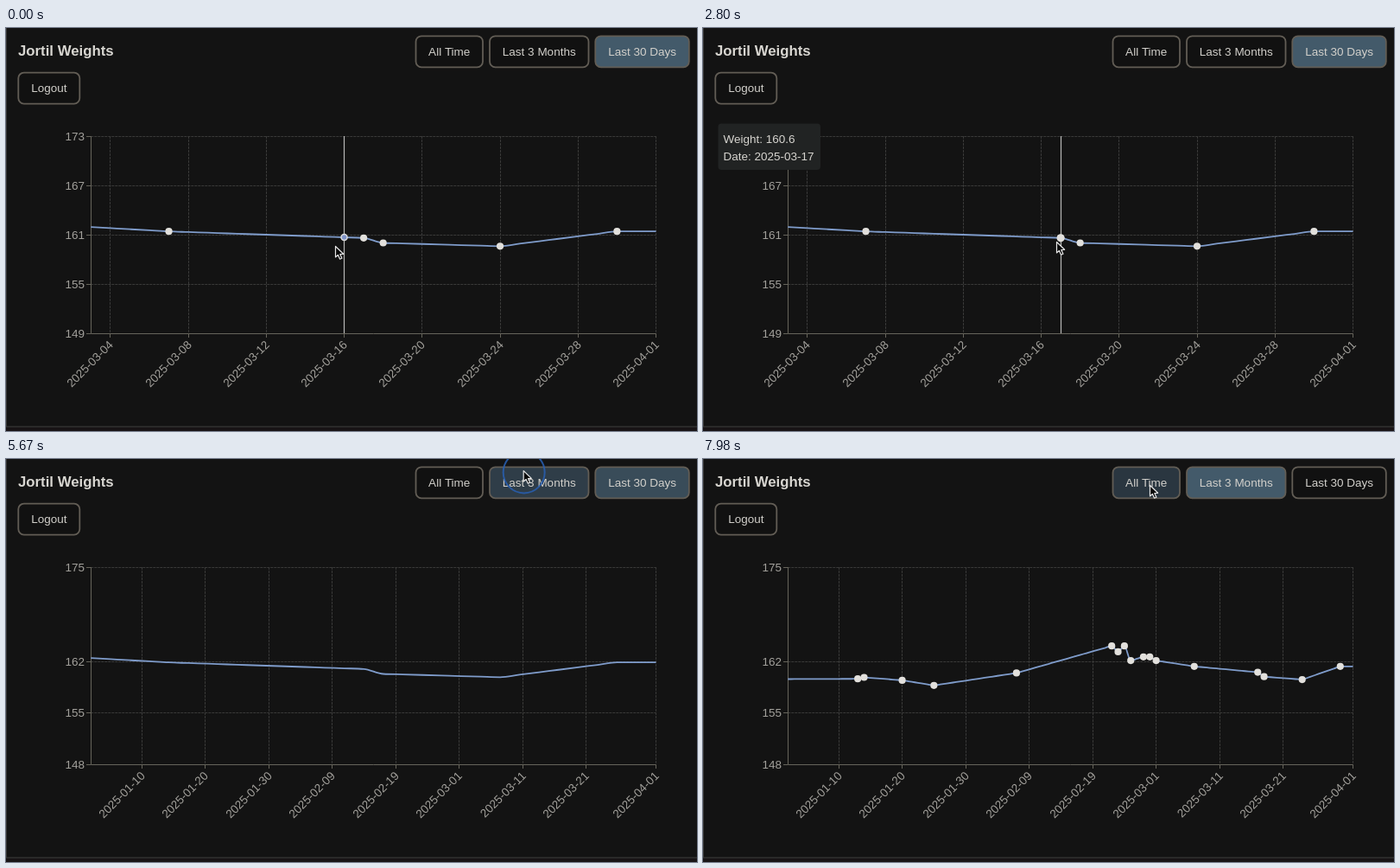
Animation of 800 by 466 pixels, one loop 8 s. Source, as an HTML page with a canvas:

```html
<!DOCTYPE html>
<html lang="en">
<head>
<meta charset="utf-8">
<title>Weight chart</title>
<style>
  html, body { margin: 0; width: 100%; height: 100%; overflow: hidden; background: #131313; }
  canvas { display: block; width: 800px; height: 466px; }
</style>
</head>
<body>
<canvas id="stage" width="800" height="466"></canvas>
<script>
const ctx = document.getElementById('stage').getContext('2d');
const FONT = '"Liberation Sans", Arial, sans-serif';
const LOOP = 8000, DAY_MS = 864e5;
const LEFT = 98.3, RIGHT = 752.5, TOP = 125, BOTTOM = 353;
const CLICK = 5590, MORPH_START = 5670, MORPH_END = 7670;
const POINTER_LAG = 100;
const BASE = [17, 17, 17], HOVER = [42, 54, 64], ACTIVE = [67, 90, 106];

const clamp = v => Math.max(0, Math.min(1, v));
const lerp = (a, b, k) => a + (b - a) * k;
const ramp = (t, start, length) => clamp((t - start) / length);
const smooth = k => k * k * (3 - 2 * k);
const crisp = v => Math.floor(v) + 0.5;
const mix = (a, b, k) => a.map((v, i) => lerp(v, b[i], k));
const rgb = c => `rgb(${c.map(Math.round)})`;

// CSS "ease", solved by bisection
function ease(x) {
  let lo = 0, hi = 1, s = 0.5;
  for (let i = 0; i < 24; i++) {
    s = (lo + hi) / 2;
    if (0.75 * s * (1 - s) + s ** 3 < x) lo = s; else hi = s;
  }
  return 0.3 * s * (1 - s) ** 2 + 3 * s * s * (1 - s) + s ** 3;
}

// Measurements: day of 2025 (Jan 1 = 0) and weight; both charts show parts of them.
const WEIGHTS = new Map([
  [-20, 159.6], [12, 159.7], [13, 159.9], [19, 159.5], [24, 158.8], [37, 160.5],
  [52, 164.2], [53, 163.4], [54, 164.2], [55, 162.2], [57, 162.7], [58, 162.7], [59, 162.2],
  [65, 161.4], [75, 160.6], [76, 160], [82, 159.6], [88, 161.4]
]);
const LAST_DAY = 90;

function weightOn(day) {
  const days = [...WEIGHTS.keys()];
  const before = days.findLast(d => d <= day);
  const after = days.find(d => d > day) ?? LAST_DAY + 1;
  const from = WEIGHTS.get(before), to = WEIGHTS.get(after) ?? from;
  return lerp(from, to, (day - before) / (after - before));
}

const dateOf = day => new Date(Date.UTC(2025, 0, 1) + day * DAY_MS).toISOString().slice(0, 10);

function makeChart(firstDay, values, firstTick, tickStep) {
  const low = values[0], high = values.at(-1);
  const xOf = day => lerp(LEFT, RIGHT, (day - firstDay) / (LAST_DAY - firstDay));
  const yOf = weight => lerp(BOTTOM, TOP, (weight - low) / (high - low));
  const points = [], ticks = [];
  for (let d = firstDay; d <= LAST_DAY; d++) points.push([xOf(d), yOf(weightOn(d))]);
  for (let d = firstTick; d < LAST_DAY - 1; d += tickStep) ticks.push(d);
  ticks.push(LAST_DAY);
  const dots = [...WEIGHTS.keys()].filter(d => d > firstDay).map(d => points[d - firstDay]);
  return { firstDay, values, ticks, points, dots, xOf, yOf };
}

const month = makeChart(61, [149, 155, 161, 167, 173], 62, 4);
const quarter = makeChart(1, [148, 155, 162, 175], 9, 10);

// Pointer moves: start, end, x, y
const POINTER_HOME = [382, 253];
const MOVES = [
  [1050, 1500, 116, 226], [1560, 1820, 219, 194], [1890, 2590, 410, 248],
  [2800, 3570, 572, 256], [3850, 4270, 606, 205], [4340, 4620, 709, 111],
  [4760, 5530, 600, 14], [5600, 6370, 586.5, 17.5], [7280, 7560, 566, 22], [7700, 7910, 518, 31]
];

const pointerAt = t => MOVES.reduce(
  (at, [start, end, x, y]) => mix(at, [x, y], smooth(ramp(t, start, end - start))), POINTER_HOME);

function text(str, x, y, color = '#a3a19c', size = 13.5, align = 'left', weight = '') {
  ctx.font = `${weight} ${size}px ${FONT}`;
  ctx.textAlign = align;
  ctx.fillStyle = color;
  ctx.fillText(str, x, y);
}

function segment(x1, y1, x2, y2, color, width = 1, dash = []) {
  ctx.setLineDash(dash);
  ctx.strokeStyle = color;
  ctx.lineWidth = width;
  ctx.beginPath();
  ctx.moveTo(x1, y1);
  ctx.lineTo(x2, y2);
  ctx.stroke();
  ctx.setLineDash([]);
}

function circle(x, y, r, fill, stroke, width = 1.5) {
  ctx.beginPath();
  ctx.arc(x, y, r, 0, Math.PI * 2);
  if (fill) { ctx.fillStyle = fill; ctx.fill(); }
  if (stroke) { ctx.strokeStyle = stroke; ctx.lineWidth = width; ctx.stroke(); }
}

function button(label, x, y, w, fill) {
  ctx.beginPath();
  ctx.roundRect(x, y, w, 36, 6.5);
  ctx.fillStyle = rgb(fill);
  ctx.fill();
  ctx.strokeStyle = '#625d55';
  ctx.lineWidth = 1.8;
  ctx.stroke();
  text(label, x + w / 2, y + 22.7, '#d2d0cb', 13.5, 'center');
}

function drawHeader(t) {
  text('Jortil Weights', 14, 31.5, '#d8d6d1', 16.8, 'left', 'bold');
  const switched = smooth(ramp(t, CLICK, 290));
  const hovered = mix(BASE, HOVER, ramp(t, 5230, 150));
  button('All Time', 474.5, 9.3, 77.5, mix(BASE, HOVER, ramp(t, 7770, 150)));
  button('Last 3 Months', 560, 9.3, 114.5, mix(hovered, ACTIVE, switched));
  button('Last 30 Days', 682.3, 9.3, 108.5, mix(ACTIVE, BASE, switched));
  button('Logout', 14.3, 51.6, 71, BASE);
}

function drawAxes(chart) {
  const grid = '#393938', axis = '#66645b';
  for (const day of chart.ticks) {
    const x = crisp(chart.xOf(day));
    segment(x, TOP, x, BOTTOM, grid, 1, [3, 1]);
    segment(x, BOTTOM, x, BOTTOM + 5, axis);
    ctx.save();
    ctx.translate(x - 2.5, 360.5);
    ctx.rotate(-Math.PI / 4);
    text(dateOf(day), 0, 9.5, undefined, 13.5, 'right');
    ctx.restore();
  }
  for (const value of chart.values) {
    const y = crisp(chart.yOf(value));
    segment(LEFT, y, RIGHT, y, grid, 1, [3, 1]);
    segment(93, y, 98, y, axis);
    text(value, 91, y + 4.8, undefined, 13.5, 'right');
  }
  segment(crisp(LEFT), TOP, crisp(LEFT), BOTTOM, axis);
  segment(LEFT, crisp(BOTTOM), RIGHT, crisp(BOTTOM), axis);
}

// Monotone cubic through points with rising x
function drawCurve(all) {
  const p = all.filter((q, i) => !i || q[0] - all[i - 1][0] > 1e-4);
  const n = p.length - 1;
  const slope = i => (p[i + 1][1] - p[i][1]) / (p[i + 1][0] - p[i][0]);
  const tangent = p.map((q, i) => {
    if (i === 0) return slope(0);
    if (i === n) return slope(n - 1);
    const h0 = q[0] - p[i - 1][0], h1 = p[i + 1][0] - q[0];
    const s0 = slope(i - 1), s1 = slope(i);
    const mean = (s0 * h1 + s1 * h0) / (h0 + h1);
    return (Math.sign(s0) + Math.sign(s1)) *
      Math.min(Math.abs(s0), Math.abs(s1), Math.abs(mean) / 2) || 0;
  });
  ctx.beginPath();
  ctx.moveTo(...p[0]);
  for (let i = 0; i < n; i++) {
    const [x0, y0] = p[i], [x1, y1] = p[i + 1], h = (x1 - x0) / 3;
    ctx.bezierCurveTo(x0 + h, y0 + h * tangent[i], x1 - h, y1 - h * tangent[i + 1], x1, y1);
  }
  ctx.strokeStyle = '#7f9ccb';
  ctx.lineWidth = 1.8;
  ctx.lineJoin = 'round';
  ctx.stroke();
}

const morph = (from, to, k) => to.map(
  (q, i) => mix(from[Math.floor(i * from.length / to.length)], q, k));

const drawDots = chart => chart.dots.forEach(p => circle(...p, 4.1, '#e2e0dc'));

function drawTooltip(day) {
  ctx.beginPath();
  ctx.roundRect(17.5, 110.5, 118.5, 53.5, 4);
  ctx.fillStyle = '#212323';
  ctx.fill();
  text(`Weight: ${weightOn(day).toFixed(1)}`, 23.5, 132.5, '#d6d4cf');
  text(`Date: ${dateOf(day)}`, 23.5, 152.5, '#d6d4cf');
}

function drawMonth(t) {
  const [x, y] = pointerAt(t - POINTER_LAG);
  const inside = y > TOP && y < BOTTOM;
  const index = Math.round((x - LEFT) / (RIGHT - LEFT) * (month.points.length - 1));
  const spot = month.points[index], day = month.firstDay + index;
  if (inside) segment(crisp(spot[0]), TOP, crisp(spot[0]), BOTTOM, '#b9b9b7', 1.2);
  drawCurve(month.points);
  drawDots(month);
  if (!inside) return;
  if (WEIGHTS.has(day)) {
    circle(...spot, 4.6, '#e2e0dc');
    drawTooltip(day);
  } else {
    circle(...spot, 3.5, '#7f93c8', '#dcdcdc');
  }
}

function drawQuarter(t) {
  const k = ease(ramp(t, MORPH_START, MORPH_END - MORPH_START));
  // Below a hundredth the points still coincide, as on the first animation step.
  drawCurve(morph(month.points, quarter.points, k < 0.01 ? 0 : k));
  if (t >= MORPH_END) drawDots(quarter);
}

function drawPointer(t) {
  const [x, y] = pointerAt(t);
  const press = (t - 5530) / 230;
  if (press > 0 && press < 1) {
    ctx.globalAlpha = 1 - press ** 4;
    circle(x, y + 1.3, lerp(12, 24, Math.min(1, press * 1.7)), null, '#285fb2', 2);
    ctx.globalAlpha = 1;
  }
  ctx.save();
  ctx.translate(x - 1, y - 1);
  ctx.beginPath();
  [[0.5, 0.5], [0.5, 13], [3.4, 10.4], [5.6, 15.2], [7.9, 14.2], [5.8, 9.5], [9.6, 9.3]]
    .forEach(p => ctx.lineTo(...p));
  ctx.closePath();
  ctx.fillStyle = '#080808';
  ctx.fill();
  ctx.strokeStyle = '#e8e8e8';
  ctx.lineWidth = 1.2;
  ctx.stroke();
  ctx.restore();
}

function draw(t) {
  ctx.fillStyle = '#131313';
  ctx.fillRect(0, 0, 800, 466);
  ctx.fillStyle = '#181315';
  ctx.fillRect(0, 462, 800, 4);
  segment(0, 461, 800, 461, '#2a2929', 2);
  segment(0.5, 0, 0.5, 461, '#393939');
  drawHeader(t);
  const clicked = t >= CLICK;
  drawAxes(clicked ? quarter : month);
  if (clicked) drawQuarter(t); else drawMonth(t);
  drawPointer(t);
}

const start = performance.now();
function tick() {
  draw((performance.now() - start) % LOOP);
  requestAnimationFrame(tick);
}
tick();
</script>
</body>
</html>
```
